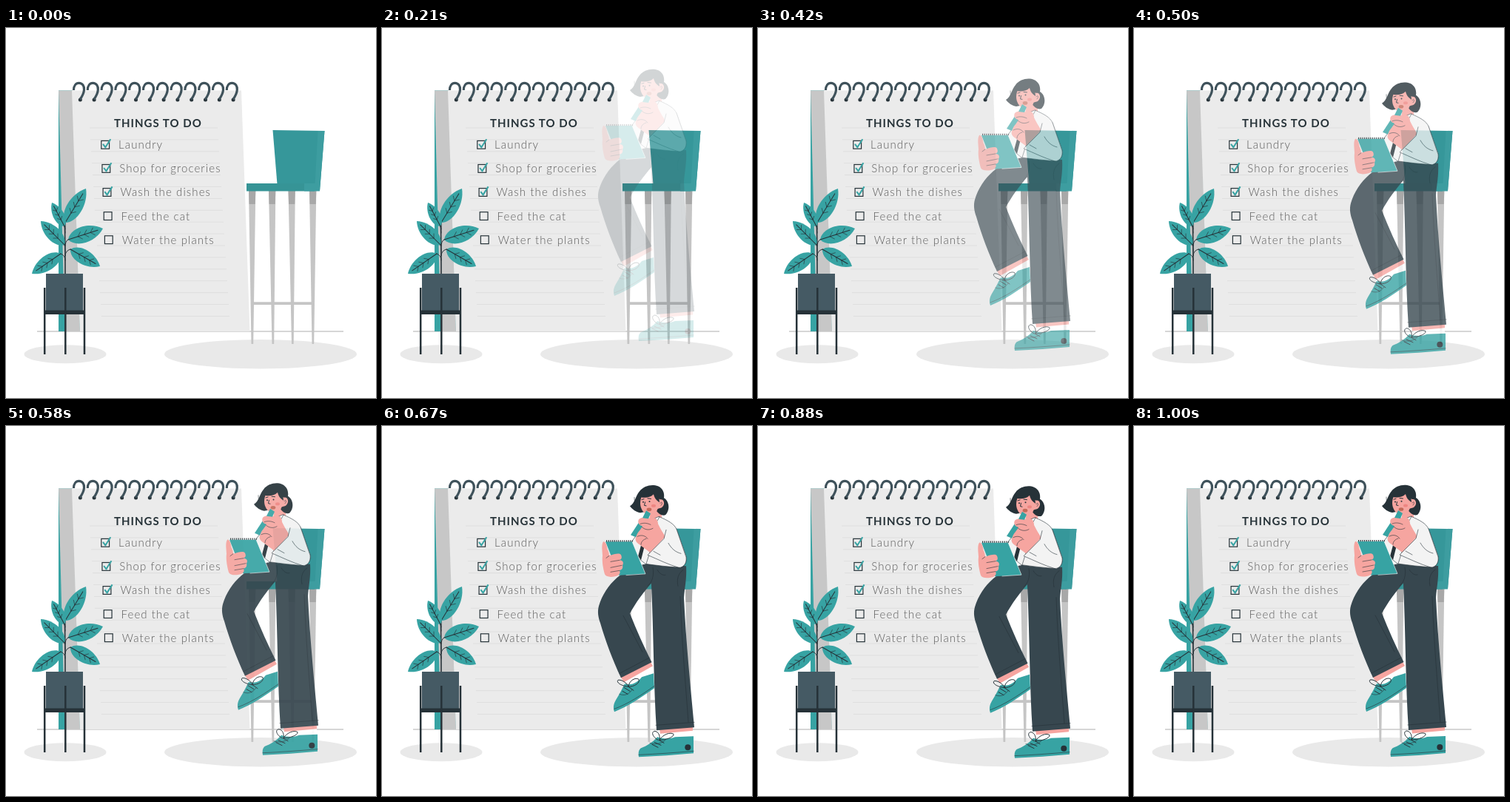
These frames come from a looping animation (500 px wide and 500 px high, 1.04 s). An HTML page:

```html
<!DOCTYPE html>
<html lang="en">
<head>
<meta charset="utf-8">
<title>Things to do</title>
<style>
  html, body { margin: 0; width: 100%; height: 100%; overflow: hidden; background: #fff; }
  svg { display: block; width: 100%; height: 100%; }
  text { font-family: Lato, "Open Sans", sans-serif; }
  .title { font-size: 15px; font-weight: 700; letter-spacing: 1px; fill: #263238; }
  .item { font-size: 15px; font-weight: 300; letter-spacing: 1.1px; fill: #5c5c5c; }
  .dark { fill: #263238; }
  .teal { fill: #37a3a3; }
  .skin { fill: #f6a5a0; }
  .pants { fill: #37474f; }
  .shirt { fill: #f3f3f3; stroke: #263238; stroke-width: .6; }
  .line { fill: none; stroke: #263238; stroke-width: 1; stroke-linecap: round; stroke-linejoin: round; }
  .thin { stroke-width: .6; }
</style>
</head>
<body>
<svg viewBox="0 0 500 500">
  <!-- floor -->
  <g fill="#e9e9e9">
    <ellipse cx="80" cy="440.7" rx="55.5" ry="12.5"/>
    <ellipse cx="344" cy="440.7" rx="130" ry="19.7"/>
  </g>
  <path d="M42 410H456" stroke="#777" stroke-width=".6"/>

  <!-- notepad -->
  <path class="teal" d="M71 84.5H90L100 410H71Z"/>
  <path fill="#c7c7c7" d="M71 84.5H90L100 410H79.5Z"/>
  <path fill="#ebebeb" d="M89 84.5H318L329.5 410H100Z"/>
  <g id="rules" stroke="#dadada" stroke-width=".7"></g>
  <g id="rings"></g>
  <text class="title" x="146" y="134">THINGS TO DO</text>
  <g id="list"></g>

  <!-- plant -->
  <path class="line" style="stroke-width:1.6" d="M80 333C80 305 80 280 79 252"/>
  <g id="leaves"></g>
  <path fill="#455a64" d="M54 332H104V382H54Z"/>
  <path class="dark" d="M52 381.500H106V387H52Z"/>
  <path d="M52.200 351V441M80.300 351V441M106 351V441" stroke="#263238" stroke-width="2.500"/>

  <!-- stool -->
  <g id="legs"></g>
  <path fill="#c5c5c5" d="M334 370.300H414V374H334Z"/>
  <path fill="#36979a" d="M360.500 138L430.500 139L424 220H403L366.500 211Z"/>
  <path fill="#3d9da0" d="M421.500 139H430.500L424 220H417Z"/>
  <path fill="#369496" d="M325 210H417V220.500H325Z"/>
  <path fill="#3d9da0" d="M403 210H424V220.500H403Z"/>

  <g id="person">
    <!-- standing foot -->
    <path fill="#fff" d="M377 412L420 410V422L378 424Z"/>
    <path class="skin" d="M375 409L420 405V411.500L376 415.500Z"/>
    <path class="teal" d="M347 447C346 441 347 437 350 435C358 432 366 427 372 420C380 423 389 423 396 420L421 419V442C397 444 372 446 347 447Z"/>
    <path class="line thin" d="M347 444C371 443 397 441 421 439M362 428C370 431 377 429 383 424"/>
    <circle class="dark" cx="413.300" cy="434" r="4"/>
    <path class="line" d="M373 424C364 419 364 412 369 412C374 413 376 419 375 424C380 416 390 413 394 416C395 420 384 424 375 424M368 427L377 431M365 430L373 434M374 424L381 428"/>

    <!-- raised foot -->
    <path fill="#fff" d="M325 343L365 323L369 335L338 352Z"/>
    <path class="skin" d="M322 338L362 317L366 324L327 346Z"/>
    <path class="teal" d="M314 386C312 380 313 375 316 370C321 362 325 354 328 348C337 351 346 346 351 339L367 334L368 354C351 366 332 379 314 386Z"/>
    <path class="line thin" d="M314 382C333 375 351 363 368 351M321 362C328 365 334 362 338 356"/>
    <path class="line" d="M333 352C323 351 316 346 319 343C324 342 331 347 333 352C334 343 343 339 347 342C349 347 341 352 333 352M327 353L335 358M325 358L332 362M333 352L340 357"/>

    <!-- trousers -->
    <path class="pants" d="M358 186C328 190 302 213 293 243C291 250 292 258 295 266C302 290 312 317 323 340L364.500 319C354 298 344 276 335 253C342 240 354 223 366 210L382 192Z"/>
    <path class="pants" d="M358 186L411 189C412 206 409 218 408 232C411 295 417 352 422 407L371 411C367 350 367 280 364 214Z"/>
    <path class="line thin" d="M321 334L361 313M370 404L422 400M366 191C368 202 365 211 359 216M407 194C400 199 398 207 400 216M403 230C405 290 410 345 414 400M372 194C375 199 379 202 383 201M352 305C343 288 334 271 326 256"/>

    <!-- neck and shirt -->
    <path class="skin" d="M364 112L378 108V126L372 138L360 130Z"/>
    <path class="shirt" d="M336 158L356 130L374 122C386 127 395 132 398 139L411 176C412 184 409 189 403 191C387 190 371 188 356 186L346 178Z"/>
    <path class="dark" d="M353 150L356 157L350 181L346 176Z"/>
    <path class="line thin" d="M363 135C370 132 373 127 375 122M362 170L357 186"/>

    <!-- hair and face -->
    <path class="dark" d="M335 108C342 104 343 93 348 88C354 80 365 78 373 81C380 84 382 91 381 97C388 101 390 113 383 120C378 122 372 117 370 113L349 117C343 116 338 112 335 108Z"/>
    <path class="skin" d="M351 95C355 96 362 95 367 91C370 95 373 98 376 99C381 98 383 105 379 109C376 112 373 110 372 113C370 119 365 122 360 120C353 118 349 111 349 104C349 100 350 97 351 95Z"/>
    <path class="dark" d="M348 93C355 94 363 92 367 88L374 94L375 103C370 100 368 96 367 92C362 97 355 97 350 96Z"/>
    <path class="line" d="M351 99.200L354 98.300M359 97.500L363.500 98M355.500 102.500L354.500 107L357 107.500"/>
    <path class="line thin" d="M376 104C378 101 380 104 377 107M341 96C341 104 344 110 349 112M384 101C386 107 386 113 383 117"/>
    <circle class="dark" cx="353" cy="102.500" r="1"/>
    <circle class="dark" cx="361.500" cy="101.700" r="1"/>
    <ellipse fill="#c46a59" cx="361" cy="112.500" rx="3.300" ry="2.300"/>
    <ellipse fill="#ee8581" cx="367" cy="107.500" rx="3" ry="2"/>

    <!-- notepad in hand -->
    <path class="teal" d="M302 156H338L356 199.500L320 201.500Z"/>
    <path class="line thin" style="stroke:#fff" d="M338.500 157L356 199.500L330 201.300"/>
    <path d="M303 155H339" stroke="#263238" stroke-width="2.200" stroke-dasharray="1.200 1.500"/>
    <path class="skin" d="M299 156C302 155 304 161 304.500 166C306 169 307 172 307 175C315 172 322 171 323 174C325 178 323 180 321 181C326 181 327 185 325 188C326 192 324 194 321 195C323 199 320 202 315 203C309 204 303 204 301 200C299 193 297 183 298 175C298 170 296 160 299 156Z"/>
    <path class="line thin" d="M307 175L303 178M321 181L309 183M324 188L309 191M321 195L309 197"/>

    <!-- pencil, hand, sleeve -->
    <path class="teal" d="M351 124L356 128L343 150L336 147Z"/>
    <path class="skin" d="M347 126C351 122 358 123 363 125C369 121 373 126 373 132C376 138 379 144 384 150L364 172C359 168 353 164 348 160C343 157 341 153 344 148C345 143 351 139 352 135C347 134 345 130 347 126Z"/>
    <path class="line thin" d="M349 132C354 130 359 131 363 133M351 136C355 140 361 141 366 138M345 149C351 146 356 148 359 152M350 160C350 156 353 153 357 152"/>
    <path class="teal" d="M357 114L363 118L360 125L352 124Z"/>
    <path class="shirt" style="stroke:none" d="M381 140L398 139L411 176C412 184 409 189 403 191C388 187 372 180 359 174C366 167 374 159 382 150Z"/>
    <path class="line thin" d="M384 140L381 152L359 174C373 180 387 187 401 191C408 191 412 185 411 177L398 139M387 158C391 165 396 170 404 172M367 169L376 174"/>
  </g>
</svg>
<script>
const $ = id => document.getElementById(id);
const fill = (id, items, draw) => $(id).innerHTML = items.map(draw).join('');
const range = n => [...Array(n).keys()];

fill('rules', range(17), i => {
  const x = 113 + i, y = 135 + i * 15.9;
  return `<path d="M${x} ${y}H${x + 173}"/>`;
});

fill('rings', range(12), i => `<g transform="translate(${98.5 + i * 18.8} 84)">
  <circle class="dark" cx="1.800" cy="13" r="2.500"/>
  <path d="M-7 0C-7-6-4-9.700 0-9.700C5-9.700 7.500-5 7-.5C6.700 5 4 9 1.500 12.500" fill="none" stroke="#3f525b" stroke-width="3.200"/></g>`);

fill('list', ['Laundry', 'Shop for groceries', 'Wash the dishes', 'Feed the cat', 'Water the plants'], (s, i) => {
  const x = 128.8 + i * 1.15, y = 152.4 + i * 32.1;
  const tick = i < 3 ? `<path d="M${x + 2.2} ${y + 4.500}l3.300 4.300l7-11" fill="none" stroke="#37a3a3" stroke-width="2"/>` : '';
  return `<rect x="${x}" y="${y}" width="10.800" height="10.800" fill="none" stroke="#263238" stroke-width="1.200"/>${tick}
    <text class="item" x="${x + 23.3}" y="${y + 10.8}">${s}</text>`;
});

// Leaf: base x, base y, tip x, tip y, half width
fill('leaves', [
  [80, 263, 108, 217, 10.5], [79, 268, 62, 236, 7.5], [79, 293, 47, 261, 9.5],
  [84, 286, 131, 271, 11], [74, 305, 35, 332, 10], [87, 299, 127, 322, 10]
], ([x, y, tx, ty, w]) => {
  const n = Math.hypot(tx - x, ty - y), a = Math.atan2(ty - y, tx - x) * 180 / Math.PI, h = w * 1.33;
  const veins = range(3).map(i => {
    const p = n * (.28 + i * .18), r = w * .45;
    return `M${p} 0l${w * .45} ${r}M${p} 0l${w * .45} ${-r}`;
  }).join('');
  return `<g transform="translate(${x} ${y}) rotate(${a})">
    <path class="teal" d="M0 0C${n * .15} ${-h} ${n * .7} ${-h} ${n} 0C${n * .7} ${h} ${n * .15} ${h} 0 0Z"/>
    <path class="line" d="M0 0H${n * .85}"/><path class="line thin" d="${veins}"/></g>
    <path class="line" d="M${x} ${y}Q80 ${y + 2} 80 ${y + 9}"/>`;
});

fill('legs', [[328, 331.5], [355, 359.5], [381.5, 386], [410, 413.5]], ([x, e]) =>
  `<path fill="#c5c5c5" d="M${x} 220h9.300L${e + 2.7} 427h-2.700Z"/>
   <path fill="#a8a8a8" d="M${x} 220h9.300l-.6 18h-8.100Z"/>`);

const bezier = (s, a, b) => 3 * s * (1 - s) ** 2 * a + 3 * s * s * (1 - s) * b + s ** 3;

// Ease with a small overshoot before settling
function ease(x) {
  let lo = 0, hi = 1;
  for (let i = 0; i < 24; i++) {
    const mid = (lo + hi) / 2;
    if (bezier(mid, .36, .5) < x) lo = mid; else hi = mid;
  }
  return bezier(lo, -.01, 1.38);
}

const LOOP = 1040, FPS = 24;
const person = $('person');

function draw(now) {
  const step = Math.floor((now % LOOP + 4.9) * FPS / 1000);
  const p = step < 2 ? 0 : ease(Math.min(1, step / FPS + .027));
  person.setAttribute('transform', `translate(0 ${30 * (p - 1)})`);
  person.style.opacity = Math.max(0, Math.min(1, p));
}

const start = performance.now();
function tick() {
  draw(performance.now() - start);
  requestAnimationFrame(tick);
}
tick();
</script>
</body>
</html>
```
